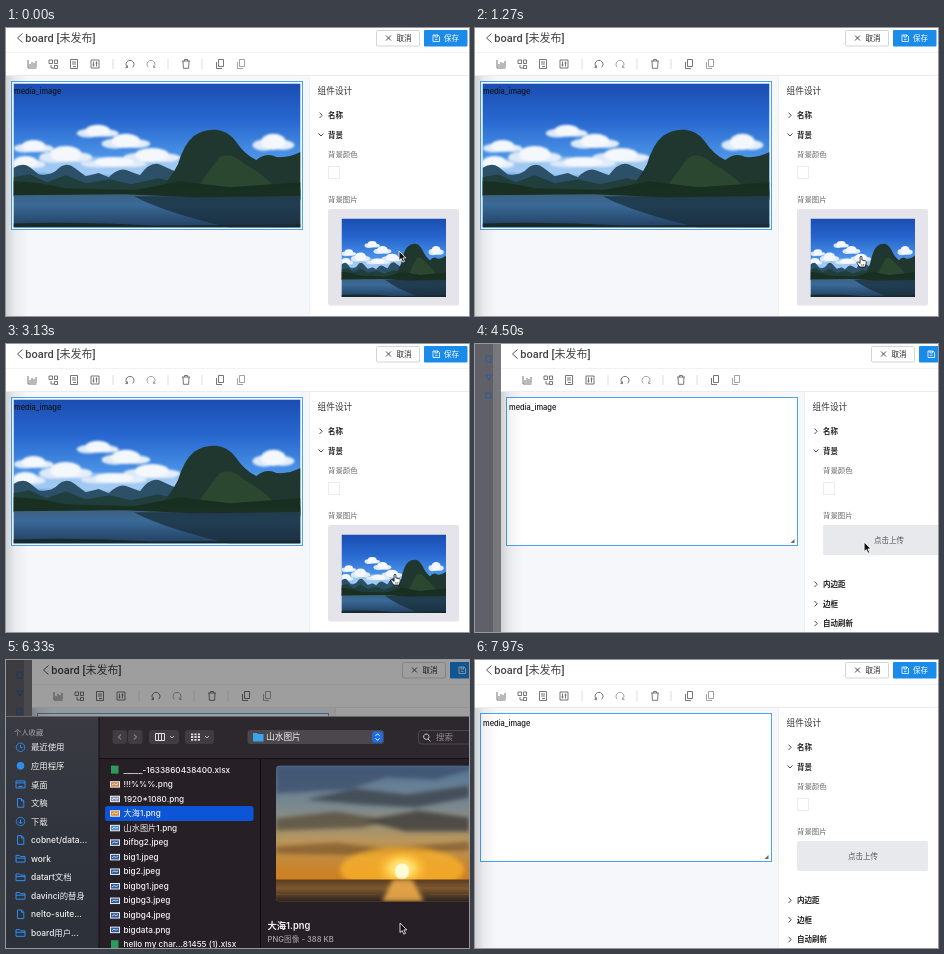
Write an HTML page that moves like this. It is 463x288 px and loops after 8 s.

```html
<!DOCTYPE html>
<html lang="zh">
<head>
<meta charset="utf-8">
<title>Board editor</title>
<style>
html, body { margin: 0; width: 100%; height: 100%; overflow: hidden; background: #fff; }
svg { display: block; width: 463px; height: 288px; }
text { font-family: Inter, "Noto Sans CJK SC", "Noto Sans CJK", sans-serif; white-space: pre; }
</style>
</head>
<body>
<svg id="stage" viewBox="0 0 463 288" xmlns="http://www.w3.org/2000/svg"></svg>
<script>
const LOOP = 8000, REMOVE = 3230, OPEN = 4500, PICK = 5520, BLUR = 7120, CLOSE = 7170, GONE = 7370;

const rect = (x, y, w, h, fill, more = '') =>
  `<rect x="${x}" y="${y}" width="${w}" height="${h}" fill="${fill}" ${more}/>`;
const text = (x, y, s, size, fill, more = '') =>
  `<text x="${x}" y="${y}" font-size="${size}" fill="${fill}" ${more}>${s}</text>`;
const line = (d, stroke, w = 1, more = '') =>
  `<path d="${d}" fill="none" stroke="${stroke}" stroke-width="${w}" ${more}/>`;
const shape = (d, fill, more = '') => `<path d="${d}" fill="${fill}" ${more}/>`;
const blob = (x, y, rx, ry, fill, more = '') =>
  `<ellipse cx="${x}" cy="${y}" rx="${rx}" ry="${ry}" fill="${fill}" ${more}/>`;
const group = (id, body, more = '') => `<g id="${id}" ${more}>${body}</g>`;
const grad = (id, stops, across) =>
  `<linearGradient id="${id}" x2="${across ? 1 : 0}" y2="${across ? 0 : 1}">` +
  stops.map(([o, c, a = 1]) => `<stop offset="${o}" stop-color="${c}" stop-opacity="${a}"/>`).join('') +
  '</linearGradient>';
const at = (x, y, body) => `<g transform="translate(${x} ${y})">${body}</g>`;

function lake() {
  const cloud = (x, y, w, h) =>
    blob(x - w * .5, y + h * .4, w * .6, h * .7, '#dce9f8') + blob(x + w * .5, y + h * .4, w * .6, h * .6, '#e4eefa') +
    blob(x, y, w * .65, h, '#f4f8fd');
  return rect(0, 0, 286, 143, 'url(#sky)') +
    '<g filter="url(#mist)">' +
    blob(88, 82, 95, 9, '#b9d8f5', 'opacity=".7"') +
    cloud(84, 47, 19, 6) + cloud(112, 57, 22, 7) + cloud(52, 70, 24, 8) + cloud(20, 62, 18, 6) +
    cloud(138, 71, 26, 7) + cloud(12, 78, 18, 6) + cloud(259, 58, 19, 8) + cloud(100, 78, 30, 5) + '</g>' +
    shape('M0 84Q9 78 16 83L25 90Q35 92 42 87Q52 76 61 84L72 92L85 89L95 93Q106 82 115 87L126 91Q137 76 147 81L158 86L172 92V112H0Z', '#2b5068') +
    shape('M0 93L16 90L33 98L52 91L72 99L96 95L117 100L144 94L165 99V112H0Z', '#203f3c') +
    shape('M147 104Q158 92 164 80Q170 60 180 52Q190 45 202 46Q214 47 222 58Q230 70 242 76Q252 68 262 73Q274 74 286 68V115H147Z', '#20372f') +
    shape('M182 106Q196 84 206 73Q218 68 230 80Q246 88 262 104Z', '#2c4730') +
    shape('M120 106L166 97L215 103L286 98V116H120Z', '#172f20') +
    rect(0, 108, 286, 35, 'url(#lakeWater)') +
    shape('M0 97Q28 98 52 104L130 106L286 105V112L180 113L110 110L0 111Z', '#182f22') +
    shape('M120 112H286V143H215Q150 128 120 112Z', '#172b35', 'opacity=".7"') +
    shape('M0 139Q70 137 140 141L286 140V143H0Z', '#172a2c');
}

function sunset() {
  return rect(0, 0, 244, 136, 'url(#dusk)') +
    '<g filter="url(#soft)">' +
    shape('M0 0H210L160 14L110 12L72 24L0 28Z', '#3a4e68', 'opacity=".75"') +
    shape('M30 34L80 23L130 29L193 20V32L140 42L85 39Z', '#343d49', 'opacity=".75"') +
    shape('M0 53L60 46L114 55L86 62L0 65Z', '#514638', 'opacity=".7"') +
    shape('M88 55L142 45L193 52V66L130 66Z', '#44403c', 'opacity=".85"') +
    shape('M0 81L60 77L110 83L193 76V85L90 90L0 88Z', '#724b24', 'opacity=".6"') +
    blob(126, 104, 62, 22, '#ffb52b', 'opacity=".7"') + '</g>' +
    blob(126, 103, 27, 19, 'url(#glow)') + blob(126, 106, 7, 8, '#fffbd6') +
    rect(0, 114, 244, 22, 'url(#sea)') +
    '<g filter="url(#soft)">' + shape('M117 114H136L148 136H106Z', '#f2b04a', 'opacity=".85"') + '</g>' +
    line('M0 122H108M145 119H244M0 129H100M154 129H244', '#7b542e', .7, 'opacity=".7"');
}

const defs = '<defs>' +
  grad('sky', [[0, '#1a4db2'], [.25, '#2767cf'], [.5, '#4a92e6'], [.75, '#93c4f2']]) +
  grad('lakeWater', [[0, '#3b607c'], [.35, '#3a6a98'], [1, '#223f60']]) +
  grad('dusk', [[0, '#54759a'], [.32, '#7d8a8e'], [.55, '#b8965c'], [.75, '#c9842d'], [.85, '#d0801e']]) +
  grad('sea', [[0, '#5a3c20'], [.4, '#7d582e'], [1, '#2b2320']]) +
  grad('shade', [[0, '#000', .15], [.4, '#000', .05], [1, '#000', 0]], true) +
  grad('side', [[0, '#3a3b42'], [.5, '#30343d'], [1, '#2b3039']]) +
  '<radialGradient id="glow"><stop stop-color="#fff6bd"/><stop offset=".45" stop-color="#ffd75a"/>' +
  '<stop offset="1" stop-color="#ffb52b" stop-opacity="0"/></radialGradient>' +
  '<filter id="soft"><feGaussianBlur stdDeviation="2"/></filter>' +
  '<filter id="mist"><feGaussianBlur stdDeviation="1.2"/></filter>' +
  '<clipPath id="frame"><rect width="244" height="136" rx="4"/></clipPath>' +
  `<symbol id="lake" viewBox="0 0 286 143" preserveAspectRatio="none">${lake()}</symbol></defs>`;

function tools() {
  const ink = '#666', pale = '#999';
  const sep = x => line(`M${x} 31V41`, '#ddd');
  const turn = 'M-2.6 3.4A4 4 0 1 1 2.6 3.4M-2.6 3.6V1.4M-2.6 3.6H-4.6';
  const pages = c => line('M-3.5 -2V4.5H2M-1.5 -4.5H3.5V2.5H-1.5Z', c, .9);
  return at(26, 36, line('M-4 -4V4H4.5M-2 3V0M0 3V-2M2 3V-1M4 3V-3', ink, .9)) +
    at(47, 36, line('M-4 -4H-.5V-.5H-4ZM1.5 -4H4.5V-.5H1.5ZM-2 1V4H1M1.5 1.5H4.5V4.5H1.5Z', ink, .9)) +
    at(68, 36, line('M-3.5 -4.5H3.5V4.5H-3.5ZM-2 -2H2M-2 0H2M-1 2.5H2', ink, .9)) +
    at(89, 36, line('M-4 -4H4V4H-4ZM-1.5 -2.5V2.5M1.5 -2.5V2.5M-2.5 1H-.5M.5 -1H2.5', ink, .9)) +
    sep(107) + at(124, 36, line(turn, ink, .9)) +
    at(145, 36, `<g transform="scale(-1 1)">${line(turn, pale, .9)}</g>`) + sep(162) +
    at(180, 36, line('M-4 -3H4M-1.5 -3V-4.5H1.5V-3M-3 -3L-2.6 4.3H2.6L3 -3', ink, .9)) +
    sep(196) + at(214, 36, pages(ink)) + at(235, 36, pages(pale));
}

function page() {
  const fold = (y, s, open) =>
    line(open ? `M312.5 ${y - 1.5}l2.5 2.5l2.5 -2.5` : `M313.5 ${y - 2.7}l2.7 2.7l-2.7 2.7`, '#333', .9) +
    text(322, y + 2.8, s, 7.5, '#222', 'font-weight="600"');
  return rect(0, 0, 463, 48, '#fff') + rect(0, 48, 463, 240, '#f5f7fa') +
    line('M0 24.5H463', '#f2f2f2') + line('M0 47.5H463', '#ececec') +
    line('M16.5 5.5L11.5 10L16.5 14.5', '#555', 1) +
    text(19.3, 13.6, 'board [未发布]', 11, '#444', 'font-weight="500" style="font-family:Roboto,\'Noto Sans CJK SC\',sans-serif"') +
    rect(370.5, 2.5, 43, 15.5, '#fff', 'rx="1" stroke="#d4d4d4"') +
    line('M380 7.5l5 5m0 -5l-5 5', '#333', .9) + text(390.5, 13, '取消', 7.5, '#222', 'font-weight="500"') +
    rect(418, 2, 43.5, 16.5, '#1b8be9', 'rx="1"') +
    line('M427 7H432L433.5 8.5V13.5H427ZM429 7V9H431.5V7M429 11.3H431.5', '#fff', .8) +
    text(438, 13, '保存', 7.5, '#fff', 'font-weight="500"') + tools() +
    rect(5.5, 53.5, 291, 148, '#fff', 'stroke="#4aa6e8"') +
    rect(0, 48, 22, 240, 'url(#shade)') +
    group('photo', rect(6.5, 54.5, 289, 146, '#e6f3fd') + '<use href="#lake" x="7.5" y="55.5" width="287" height="144"/>') +
    text(8, 66, 'media_image', 7.5, '#111', 'font-weight="500"') +
    group('grip', shape('M293.5 195V199H289.5Z', '#667')) +
    rect(303, 48, 186, 240, '#fff') + line('M303.5 48V288', '#eeeff2') +
    text(311.5, 65.5, '组件设计', 8.7, '#333', 'font-weight="500"') +
    fold(87.3, '名称') + fold(107, '背景', true) +
    text(322, 129.3, '背景颜色', 7.4, '#666') + rect(322.5, 138.5, 11, 12, '#fff', 'stroke="#ebebeb"') +
    text(322, 174.3, '背景图片', 7.4, '#666') +
    group('thumb', rect(322, 181, 131, 96.5, '#e4e4ea', 'rx="2"') +
      '<use href="#lake" x="335.5" y="190.5" width="104.5" height="78.5"/>') +
    group('upload', rect(322, 181, 131, 30, '#e8e9ec', 'rx="2"') +
      text(373, 199, '点击上传', 7.5, '#555') +
      fold(240.3, '内边距') + fold(259.8, '边框') + fold(279.5, '自动刷新'));
}

function sidebar() {
  const blue = '#2f8df0';
  const icons = {
    clock: line('M0 -4.2A4.2 4.2 0 1 1 -.01 -4.2M0 -2.5V.3H2', blue),
    dot: blob(0, 0, 3.8, 3.8, blue),
    desk: line('M-4.5 -3.5H4.5V3.5H-4.5ZM-4.5 -1.5H4.5M-2 2H2', blue),
    doc: line('M-3 -4.3H1L3.3 -2V4.3H-3ZM1 -4.3V-2H3.3', blue),
    down: line('M0 -4.2A4.2 4.2 0 1 1 -.01 -4.2M0 -2V2M-1.8 .4L0 2.2L1.8 .4', blue),
    folder: line('M-4.5 -3.2H-1L0 -2H4.5V3.5H-4.5ZM-4.5 -.5H4.5', blue)
  };
  const rows = [['clock', '最近使用'], ['dot', '应用程序'], ['desk', '桌面'], ['doc', '文稿'], ['down', '下载'],
    ['doc', 'cobnet/data...'], ['folder', 'work'], ['folder', 'datart文档'], ['folder', 'davinci的替身'],
    ['doc', 'nelto-suite...'], ['folder', 'board用户...']];
  return rows.map(([icon, s], i) => {
    const y = 87.3 + i * 18.55;
    return at(14.5, y, icons[icon]) + text(25, y + 3.1, s, 8.4, '#eee', 'font-weight="500"');
  }).join('');
}

function files() {
  const names = ['_____-1633860438400.xlsx', '!!!%%%.png', '1920*1080.png', '大海1.png', '山水图片1.png',
    'bifbg2.jpeg', 'big1.jpeg', 'big2.jpeg', 'bigbg1.jpeg', 'bigbg3.jpeg', 'bigbg4.jpeg', 'bigdata.png',
    'hello my char...81455 (1).xlsx'];
  const tints = ['#c98b4a', '#8899b5', '#d98d32', '#4f8fd0'];
  return names.map((s, i) => {
    const y = 109.6 + i * 14.55;
    const icon = s.endsWith('xlsx')
      ? rect(105, y - 4, 7.5, 8, '#2d9a5b')
      : rect(104, y - 3, 10, 6.5, '#e8e8e8') + rect(105, y - 2, 8, 4.5, i > 4 ? '#2d5aa0' : tints[i - 1]) +
        line(`M106 ${y + 1}l2 -1.5l2 1l2 -1`, '#fff', .7);
    return icon + text(117.5, y + 2.9, s, 8.2, '#f2f2f2', 'font-weight="500"');
  }).join('');
}

function sheet() {
  const btn = (x, w) => rect(x, 70, w, 14, '#413b42', 'rx="3"');
  const drop = x => line(`M${x - 2} 76l2 2l2 -2`, '#bbb', 1);
  return rect(-40, 56.5, 540, 260, '#261f26', 'stroke="#69666a" stroke-width="1"') +
    rect(-40, 57, 133, 240, 'url(#side)') + rect(93, 57, 400, 41, '#2d272e') +
    line('M93 98.5H463', '#151115') + line('M93 57V288', '#151318') + line('M254.5 99V288', '#0f0c0f') +
    group('inner',
      text(8, 75, '个人收藏', 7.3, '#a5a6ab', 'id="heading" font-weight="500"') + group('places', sidebar()) +
      rect(99, 146, 148.5, 15, '#0b55d6', 'id="mark" rx="2.5"') + files() +
      group('preview', at(270, 105.5, `<g clip-path="url(#frame)">${sunset()}</g>`) +
        text(261.5, 269, '大海1.png', 9.3, '#f2f2f2', 'font-weight="600"') +
        text(261.5, 281.8, 'PNG图像 - 388 KB', 7.7, '#a9a5aa', 'font-weight="500"'))) +
    btn(106.5, 14.5) + btn(122, 14.5) +
    line('M115 74.5l-2.5 2.5l2.5 2.5M128 74.5l2.5 2.5l-2.5 2.5', '#807a81', 1.1) +
    btn(143, 30) + line('M149.5 73.5H158.5V80.5H149.5ZM152.5 73.5V80.5M155.5 73.5V80.5', '#ddd', 1) + drop(166) +
    btn(179, 29) + line('M185 74.3H194M185 77H194M185 79.8H194', '#ddd', 1.8, 'stroke-dasharray="2.2 1.2"') + drop(201) +
    rect(241.5, 70, 136.5, 14, '#4c464d', 'rx="3"') +
    shape('M247 73H251L252 74H257.5V81.5H247Z', '#3ba4ea') +
    text(260, 80.3, '山水图片', 8.7, '#f0f0f0', 'font-weight="500"') +
    rect(366, 71.3, 11, 11.5, '#1f6be0', 'id="knob" rx="2.5"') +
    line('M369.5 75.8l2 -2l2 2M369.5 78.3l2 2l2 -2', '#fff', 1) +
    rect(412.5, 70.5, 70, 13.5, '#2f292f', 'rx="3" stroke="#555056" stroke-width=".8"') +
    line('M422 79l2.5 2.5M423 76.5A2.7 2.7 0 1 1 422.99 76.4', '#ccc', 1) +
    text(430, 80.2, '搜索', 8.5, '#8f8a90');
}

const strip = rect(-26, 0, 26, 288, '#77777c') + rect(-26, 0, 18, 288, '#606168') +
  line('M-15 12h5v6h-5zM-15 31h6l-3 5zM-15 49h5v5h-5z', '#335d92', 1.2);

document.getElementById('stage').innerHTML = defs +
  group('page', page() + strip) + rect(0, 0, 463, 288, '#000', 'id="dim"') + group('sheet', sheet()) +
  group('arrow', shape('M0 0V9.5L2.2 7.6L3.8 11.2L5.5 10.4L3.9 6.9H6.8Z', '#111', 'stroke="#fff" stroke-width=".8"')) +
  group('hand', shape('M-.9 .8Q0 -.8 .9 .8V4L4.4 4.8Q5.6 5.2 5.3 7L4.2 11H-1.3L-4.2 6.8Q-3.8 5.2 -2.3 6.3L-.9 7.4Z',
    '#fff', 'stroke="#111" stroke-width=".8"') + line('M.9 8V9.8M2.7 8V9.8', '#111', .6));

const ui = {};
document.querySelectorAll('#stage [id]').forEach(e => ui[e.id] = e);

// Pointer stops: time, x, y
const path = [[0, 393, 223], [350, 387, 227], [1270, 386, 228], [3130, 389, 230], [3450, 389, 230],
  [3950, 388, 198], [4970, 390, 198], [5050, 390, 198], [5430, 152, 152], [5750, 152, 152],
  [6330, 394, 263], [6550, 430, 300]];

const clamp = v => Math.max(0, Math.min(1, v));
const ease = v => { v = clamp(v); return v * v * (3 - 2 * v); };
const show = (e, on) => e.setAttribute('display', on ? 'inline' : 'none');
const move = (e, x, y) => e.setAttribute('transform', `translate(${x} ${y})`);

function pointer(t) {
  const i = path.findIndex(p => p[0] > t);
  if (i < 0) return path[path.length - 1].slice(1);
  const [t0, x0, y0] = path[i - 1], [t1, x1, y1] = path[i];
  const k = ease((t - t0) / (t1 - t0));
  return [x0 + (x1 - x0) * k, y0 + (y1 - y0) * k];
}

function draw(t) {
  const filled = t < REMOVE, modal = t >= OPEN && t < GONE, idle = t >= BLUR;
  for (const e of [ui.photo, ui.thumb]) show(e, filled);
  for (const e of [ui.upload, ui.grip]) show(e, !filled);

  const k = Math.min(ease((t - OPEN) / 130), 1 - ease((t - CLOSE) / (GONE - CLOSE)));
  move(ui.page, modal ? 26 : 0, 0);
  show(ui.dim, modal);
  ui.dim.setAttribute('opacity', .38 * k);
  show(ui.sheet, modal);
  ui.sheet.setAttribute('opacity', k);

  move(ui.inner, idle ? -.8 : 0, idle ? -1 : 0);
  ui.places.setAttribute('opacity', idle ? .45 : 1);
  ui.heading.setAttribute('fill', idle ? '#c8c8cc' : '#a5a6ab');
  ui.knob.setAttribute('fill', idle ? '#4c464d' : '#1f6be0');
  for (const e of [ui.mark, ui.preview]) show(e, t >= PICK);

  const [x, y] = pointer(t);
  const hand = filled ? t > 150 : t < OPEN && y < 211;
  show(ui.hand, hand);
  show(ui.arrow, !hand && t < 6550);
  move(hand ? ui.hand : ui.arrow, x, y);
}

const start = performance.now();
function tick() {
  draw((performance.now() - start) % LOOP);
  requestAnimationFrame(tick);
}
tick();
</script>
</body>
</html>
```
